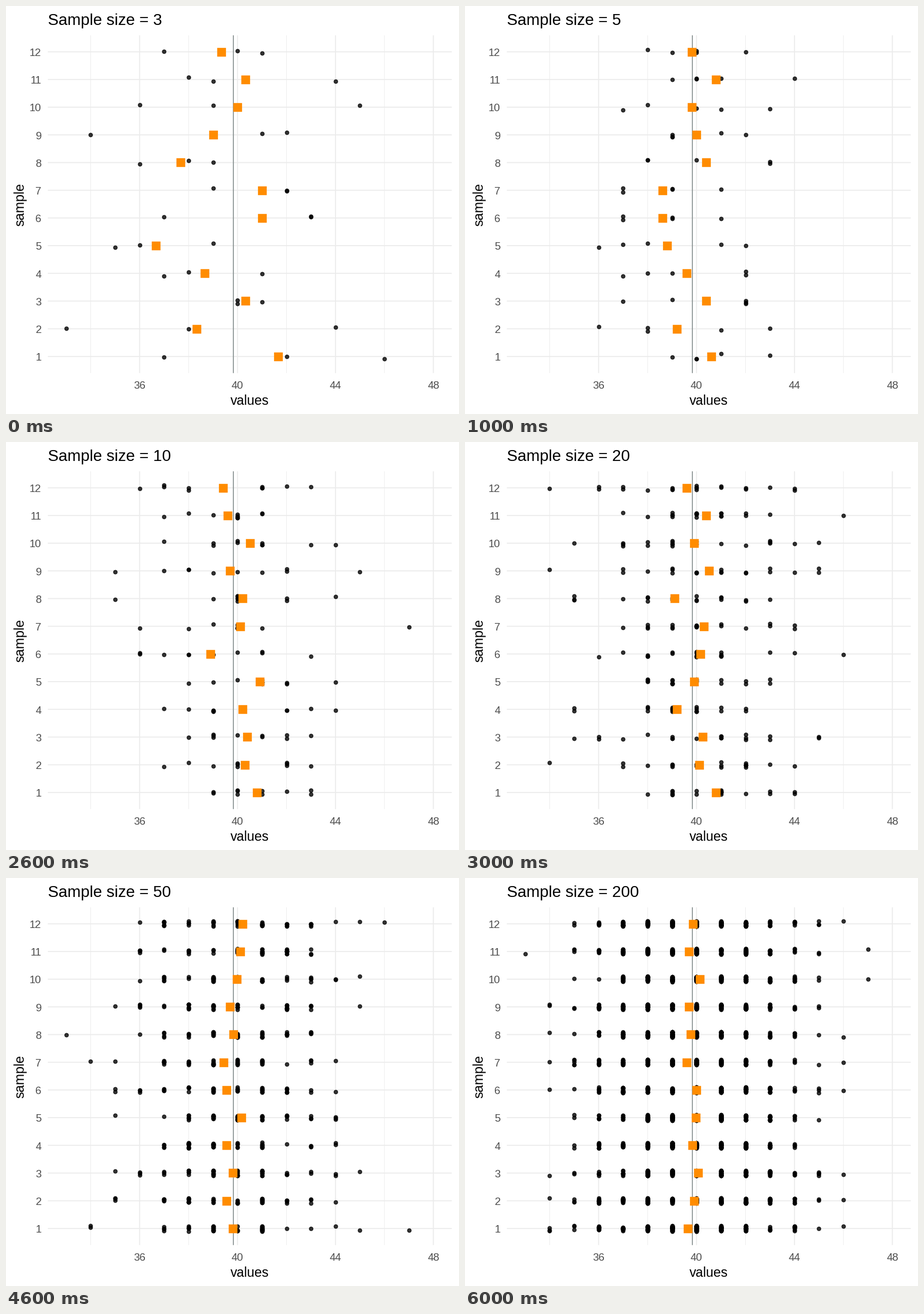
Write a matplotlib script that moves like this. It is 789x710 px and loops after 7000 ms.

```python
import numpy as np
import matplotlib
import matplotlib.pyplot as plt
from matplotlib.animation import FuncAnimation

W, H, DPI = 789, 710, 100
LEFT, RIGHT, TOP, BOTTOM = 72.8, 776.4, 51, 638.8
PT = 72 / DPI  # points per pixel
POP_MEAN, POP_SD = 39.83, 2.0
JITTER = 0.1
ROWS = range(1, 13)

# Mean of each sample from row 1 upwards, by sample size
MEANS = {
    3: (41.67, 38.33, 40.33, 38.67, 36.67, 41, 41, 37.67, 39, 40, 40.33, 39.33),
    5: (40.6, 39.2, 40.4, 39.6, 38.8, 38.6, 38.6, 40.4, 40, 39.8, 40.8, 39.8),
    10: (40.8, 40.3, 40.4, 40.2, 40.9, 38.9, 40.1, 40.2, 39.7, 40.5, 39.6, 39.4),
    20: (40.8, 40.1, 40.25, 39.2, 39.9, 40.15, 40.3, 39.1, 40.5, 39.9, 40.4, 39.6),
    50: (39.8, 39.54, 39.8, 39.54, 40.16, 39.56, 39.42, 39.85, 39.7, 39.95, 40.1, 40.2),
    100: (39.79, 40.35, 40.1, 39.73, 39.73, 39.73, 39.89, 39.52, 39.92, 40.1, 39.87, 39.98),
    200: (39.65, 39.89, 40.06, 39.83, 39.96, 39.99, 39.59, 39.77, 39.69, 40.14, 39.69, 39.85),
}
SIZES = list(MEANS)

matplotlib.rcParams["font.family"] = "Liberation Sans"


def px(value):
    return LEFT + (value - 32.25) * 42.64


def py(row):
    return BOTTOM - (row - 0.4) * 48.2


def draw_sample(rng, size, mean):
    """Whole numbers around the mean, nudged until their sum fits it."""
    values = rng.normal(mean, POP_SD, size).round().clip(33, 48)
    total = round(mean * size)
    while values.sum() != total:
        values[rng.integers(size)] += np.sign(total - values.sum())
    return values


def build(size):
    """Pixel positions of all dots and of the mean squares for one sample size."""
    rng = np.random.default_rng(size)
    dots, squares = [], []
    for row, mean in zip(ROWS, MEANS[size]):
        values = draw_sample(rng, size, mean)
        heights = row + rng.uniform(-JITTER, JITTER, size)
        dots.append(np.column_stack([px(values), py(heights)]))
        squares.append((px(values.mean()), py(row)))
    return np.vstack(dots), squares


scenes = [build(size) for size in SIZES]

fig = plt.figure(figsize=(W / DPI, H / DPI), dpi=DPI, facecolor="white")
ax = fig.add_axes([0, 0, 1, 1])
ax.set(xlim=(0, W), ylim=(H, 0))
ax.axis("off")


def line(xs, ys, width, color="#EBEBEB"):
    ax.plot(xs, ys, color=color, lw=width * PT, solid_capstyle="butt", snap=False, zorder=1)


def label(x, y, text, size, color="black", **kw):
    return ax.text(x, y, text, size=size * PT, color=color, va="baseline", **kw)


def markers(diameter, shape, color, edge, zorder):
    return ax.scatter([], [], s=(diameter * PT) ** 2, marker=shape, facecolor=[color],
                      edgecolor=[color], linewidth=edge * PT, snap=False, zorder=zorder)


for value in range(34, 49, 2):
    major = value % 4 == 0
    line([px(value)] * 2, [TOP, BOTTOM], 1.7 if major else 0.85)
    if major:
        label(px(value), 666, str(value), 18.6, "#4D4D4D", ha="center")
for row in ROWS:
    line([LEFT, RIGHT], [py(row)] * 2, 1.7)
    label(61.5, py(row) + 7.3, str(row), 18.6, "#4D4D4D", ha="right")
line([px(POP_MEAN)] * 2, [TOP, BOTTOM], 1.7, "#8B9393")

label(424.5, 694, "values", 23.3, ha="center")
label(31.5, 345, "sample", 23.3, ha="center", rotation=90, rotation_mode="anchor")
title = label(73, 33, "", 27.9)

dot_art = markers(6.5, "o", (0, 0, 0, 0.8), 1.2, 2)
mean_art = markers(15.3, "s", "#FF8C00", 0, 3)


def update(i):
    dots, squares = scenes[i]
    title.set_text(f"Sample size = {SIZES[i]}")
    dot_art.set_offsets(dots)
    mean_art.set_offsets(squares)
    return title, dot_art, mean_art


anim = FuncAnimation(fig, update, frames=len(SIZES), interval=1000, repeat=True,
                     repeat_delay=0, blit=False)
plt.show()
```
